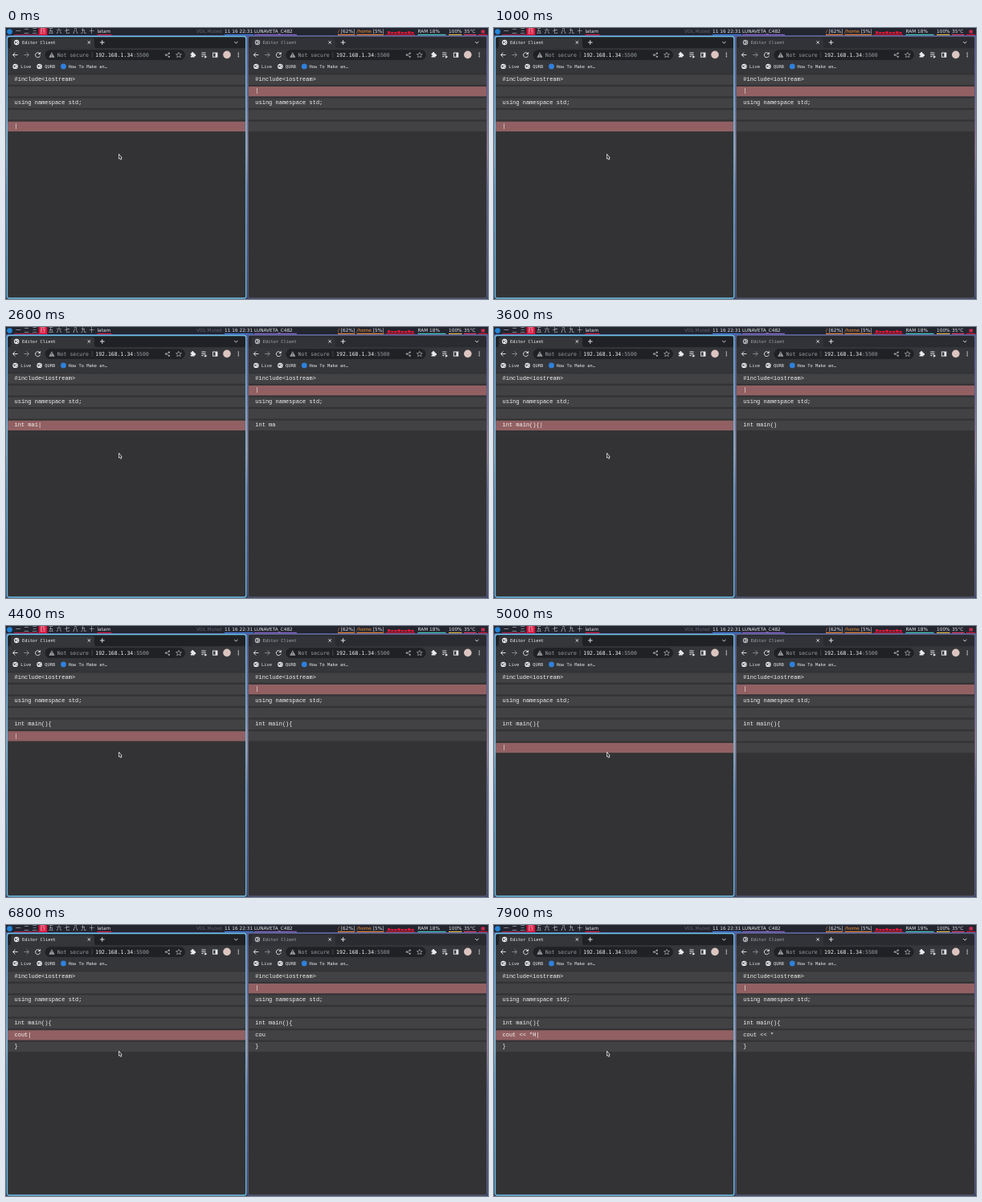
Animation of 600 by 338 pixels, one loop 8 s. Source, as an HTML page:

```html
<!DOCTYPE html>
<html lang="en">
<head>
<meta charset="utf-8">
<title>Shared editor</title>
<style>
  html, body { margin: 0; width: 100%; height: 100%; overflow: hidden; background: #333335; }
  svg { display: block; width: 600px; height: 338px; }
  text { white-space: pre; }
  .bar { font: 5.8px "DejaVu Sans", sans-serif; fill: #e4e6ea; }
  .cjk { font: 6.4px "Noto Sans CJK JP", "Noto Sans CJK", sans-serif; fill: #d5d7de; text-anchor: middle; }
  .ui { font: 5.35px "DejaVu Sans Mono", monospace; fill: #e8eaed; }
  .url { font: 6.5px "DejaVu Sans Mono", monospace; fill: #9aa0a6; }
  .code { font: 7px "Liberation Mono", monospace; fill: #f4f4f4; }
  .line { fill: none; stroke: #dadce0; stroke-width: 1; }
  .dim { stroke: #83868b; }
</style>
</head>
<body>
<svg id="stage" viewBox="0 0 600 338"></svg>
<script>
const LOOP = 8000;
const GAP = 299.4;
const START = ['#include<iostream>', '', 'using namespace std;', '', ''];
const KEYS = [
  [1700, 'i'], [1900, 'n'], [2000, 't'], [2200, ' '], [2400, 'm'], [2500, 'a'],
  [2600, 'i'], [2700, 'n'], [3000, '('], [3200, ')'], [3500, '{'],
  [4100, 'Enter'], [4700, 'Enter'], [5100, '}'], [5600, 'Up'],
  [6300, 'c'], [6500, 'o'], [6600, 'u'], [6700, 't'], [6900, ' '],
  [7000, '<'], [7200, '<'], [7300, ' '], [7600, '"'], [7900, 'H']
];
const RAM_STEP = 6900;

const rect = (x, y, w, h, fill, rx = 0) =>
  `<rect x="${x}" y="${y}" width="${w}" height="${h}" fill="${fill}" rx="${rx}"/>`;
const circle = (x, y, r, fill) => `<circle cx="${x}" cy="${y}" r="${r}" fill="${fill}"/>`;
const label = (cls, x, y, str, attrs = '') =>
  `<text class="${cls}" x="${x}" y="${y}" ${attrs}>${str}</text>`;
const line = (d, cls = '') => `<path class="line ${cls}" d="${d}"/>`;
const globe = (x, y) => circle(x, y, 3.2, '#eef0f2') +
  `<path d="M${x - 2.2} ${y - 1.4}l1.8 .3l.8 1.3l-1.4 .7l-.4 1.4zM${x + .6} ${y - 2.3}l1.5 1.2l-1.4 .5zM${x + .7} ${y + .6}l1.6 .1l-1.3 1.7z" fill="#4a4c51"/>`;

function topBar() {
  const days = [...'一二三四五六七八九十'];
  const units = [
    [113.5, 'latam', 18, '#d2193c'],
    [272, '11 16 22:31', 36, '#3c78d8'],
    [309, 'LUNAVETA_C482', 53, '#8a62c4'],
    [413, '<tspan fill="#f0923c">/</tspan> [62%]', 21.5, '#e8853a'],
    [436.5, '<tspan fill="#f0923c">/home</tspan> [5%]', 34, '#e8853a'],
    [512.5, 'RAM 18%', 35, '#45c7bb', 'id="ram"'],
    [551, '100%', 16.5, '#e0b73c'],
    [570, '35°C', 15.5, '#e23a63']
  ];
  let s = rect(0, 0, 600, 9, '#23252f') + circle(4.5, 4.6, 3.4, '#2384d8');
  s += rect(10, 8, 30, 1, '#b51e43') + rect(40.6, 0, 10.6, 9, '#e1143c');
  days.forEach((d, i) => s += label('cjk', 15.3 + i * 10.15, 6.3, d));
  for (const [x, str, w, color, attrs] of units)
    s += rect(x, 7.8, w, 1.2, color) + label('bar', x, 5.9, str, attrs);
  s += label('bar', 237, 5.9, 'VOL Muted', 'style="fill:#62656f"');
  s += rect(473, 7.8, 36, 1.2, '#d71735');
  for (let i = 0; i < 8; i++) s += rect(475 + i * 4.2, i % 3 ? 5 : 4.2, 3.2, i % 3 ? 2 : 2.8, '#ee1738');
  return s + rect(588, 7.8, 11, 1.2, '#d71735') + rect(591.5, 2.5, 4.5, 4, '#c62b50');
}

function toolbar() {
  let s = line('M14.6 33.5H8.6M11.4 30.6L8.5 33.5L11.4 36.4') +
    line('M22.4 33.5H28.4M25.6 30.6L28.5 33.5L25.6 36.4', 'dim') +
    line('M42 31.9A3 3 0 1 0 42.5 34.3M42.6 30.2V32.5H40.2');
  s += rect(48.5, 27.3, 174.5, 12.6, '#202124', 6.3);
  s += `<path d="M57 30.2L60.6 36.7H53.4Z" fill="#a0a4a9"/>` + rect(56.6, 32.2, .8, 2.2, '#202124') + rect(56.6, 35, .8, .8, '#202124');
  s += label('url', 63.8, 35.8, 'Not secure') + rect(106.8, 30, .6, 7, '#5b5e63');
  s += label('url', 111.3, 35.8, '<tspan fill="#f1f3f4">192.168.1.34</tspan>:5500');
  s += line('M203 31.8L199 33.6L203 35.6', 'dim') +
    circle(203, 31.6, 1.1, '#a7abb0') + circle(199, 33.6, 1.1, '#a7abb0') + circle(203, 35.8, 1.1, '#a7abb0');
  s += `<path class="line" style="stroke-width:.7;stroke:#b0b3b8" d="M215 30.3l1 2.2 2.4.2-1.8 1.6.6 2.4-2.2-1.3-2.2 1.3.6-2.4-1.8-1.6 2.4-.2z"/>`;
  s += rect(229.8, 31.6, 5, 5, '#e8eaed', .7) + circle(232.3, 31.3, 1.2, '#e8eaed') + circle(235.1, 34, 1.2, '#e8eaed') + circle(230, 34.2, .9, '#35363a');
  s += line('M243.4 31H248.6M243.4 33.3H248.6M243.4 35.6H246') + `<path d="M247.2 34.2L250.4 36L247.2 37.8Z" fill="#e8eaed"/>`;
  s += `<rect class="line" x="257.6" y="31" width="5.4" height="5.2"/>` + rect(260.6, 31, 2.4, 5.2, '#e8eaed');
  s += circle(275, 33.4, 4.8, '#dcc5c0');
  for (const y of [31.2, 33.5, 35.8]) s += circle(289.3, y, .75, '#e8eaed');
  return s;
}

function browser(id, x, active) {
  const border = active ? '#6cc0e4' : '#5d607c';
  const strip = active ? '#202124' : '#2a2b31';
  const tab = active ? '#35363a' : '#323338';
  const tone = active ? '#f1f3f4' : '#a8abb2';
  let s = rect(1.6, 10.6, 297, 326.4, '#333335', 2.5) + rect(2, 11, 296.4, 15, strip, 2);
  s += `<path d="M3 25.5Q6 25 6 22V15Q6 12.6 9 12.6H107Q110 12.6 110 15V22Q110 25 113 25.5Z" fill="${tab}"/>`;
  s += rect(2, 25.2, 296.2, 31.2, '#35363a');
  s += `<g opacity="${active ? 1 : .7}">${globe(13.2, 18)}</g>`;
  s += label('ui', 20, 19.9, 'Editor Client', `style="fill:${tone}"`);
  s += line('M101.7 16.3L105.1 19.7M105.1 16.3L101.7 19.7') + line('M117 18H122.6M119.8 15.2V20.8') +
    line('M284.3 17L286.4 19.1L288.5 17');
  s += toolbar();
  s += globe(11.6, 47.9) + label('ui', 18.3, 49.8, 'Live');
  s += globe(41.6, 47.9) + label('ui', 48.3, 49.8, 'QURB');
  s += circle(71.5, 47.9, 3.4, '#2f80dc') + label('ui', 77.7, 49.8, 'How To Make an…');
  s += `<g id="${id}"></g>`;
  s += `<rect x="1.5" y="10.5" width="297.3" height="326.5" rx="2.5" fill="none" stroke="${border}" stroke-width="${active ? 1.3 : 1}"/>`;
  return `<g transform="translate(${x} 0)">${s}</g>`;
}

// Replays the first n keys.
function edit(n) {
  const lines = START.slice();
  let row = 4;
  for (const [, key] of KEYS.slice(0, n)) {
    if (key === 'Enter') lines.splice(++row, 0, '');
    else if (key === 'Up') row--;
    else lines[row] += key;
  }
  return { lines, row };
}

const escape = str => str.replace(/&/g, '&amp;').replace(/</g, '&lt;');
const rows = (lines, row) => lines.map((str, i) => {
  const y = 58 + i * 14.57, here = i === row;
  return rect(2.2, y + .4, 296, 12.3, here ? '#926062' : '#424244') +
    label('code', 10.5, (y + 7.9).toFixed(2), escape(str) + (here ? '|' : ''));
}).join('');

const find = id => document.getElementById(id);
find('stage').innerHTML = `
  <defs><linearGradient id="wall" x2="0" y2="1">
    <stop stop-color="#4c5c9a"/><stop offset=".25" stop-color="#77709c"/>
    <stop offset=".45" stop-color="#a78a93"/><stop offset=".6" stop-color="#64658c"/>
    <stop offset="1" stop-color="#394466"/>
  </linearGradient></defs>` +
  rect(0, 0, 600, 338, 'url(#wall)') + topBar() +
  browser('local', 0, true) + browser('remote', GAP + .4, false) +
  `<path d="M140.6 157.2V163.2L141.7 162.3L142.6 164.2L143.9 163.7L143.1 161.8H144.2Z" fill="#222" stroke="#f2f2f2" stroke-width=".8" stroke-linejoin="round"/>`;

let shown = -1;
function draw(t) {
  const n = KEYS.filter(([at]) => at <= t).length;
  find('ram').textContent = t < RAM_STEP ? 'RAM 18%' : 'RAM 19%';
  if (n === shown) return;
  shown = n;
  // The peer misses the newest character until the next key.
  const typed = n > 0 && KEYS[n - 1][1].length === 1;
  const { lines, row } = edit(n);
  find('local').innerHTML = rows(lines, row);
  find('remote').innerHTML = rows(edit(typed ? n - 1 : n).lines, 1);
}

const begin = performance.now();
function tick() {
  draw((performance.now() - begin) % LOOP);
  requestAnimationFrame(tick);
}
tick();
</script>
</body>
</html>
```
